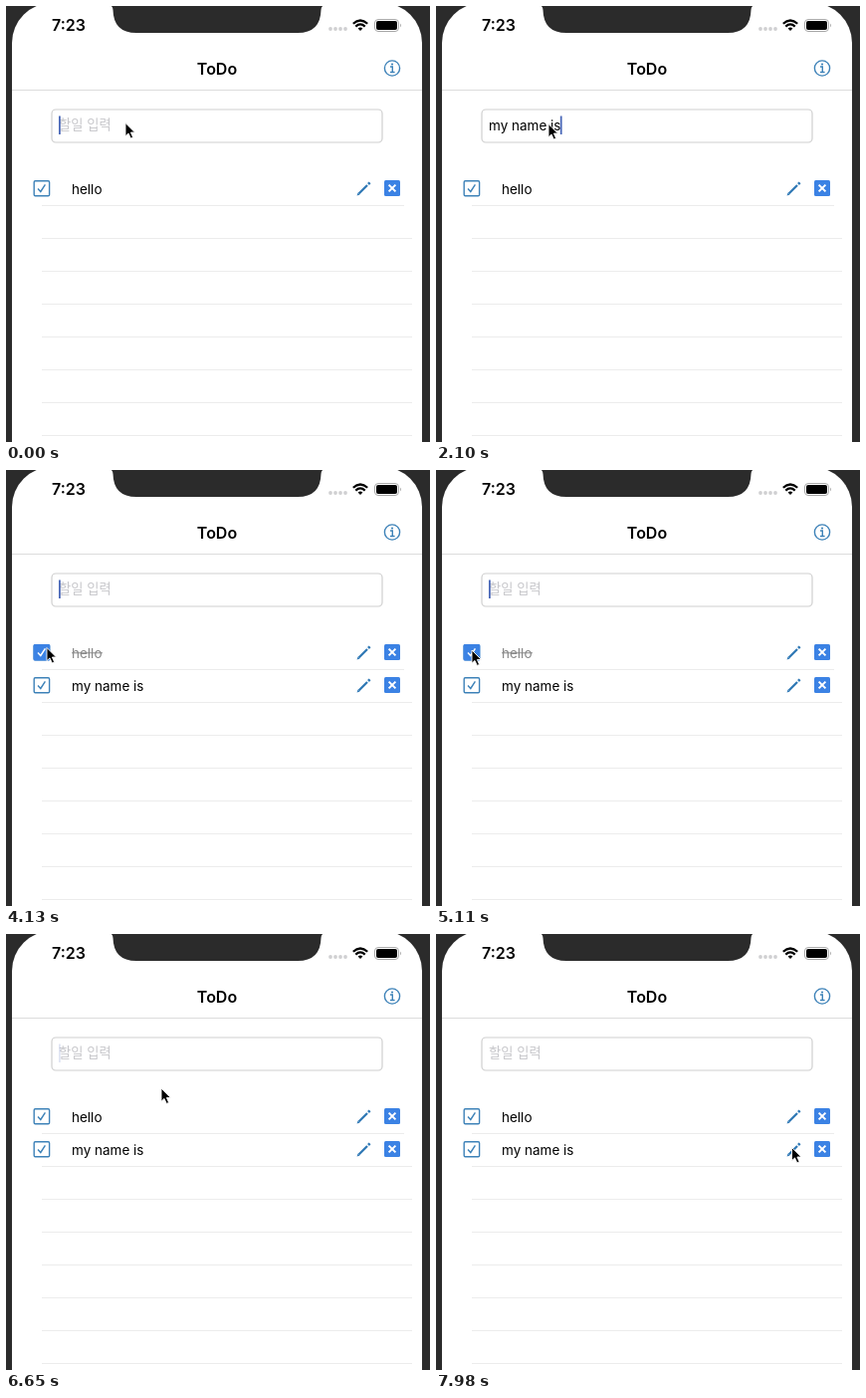
Recreate the animation shown at these times as an HTML page. Size 426 by 438 pixels, loop 8 s.

```html
<!DOCTYPE html>
<html lang="ko">
<head>
<meta charset="utf-8">
<style>
  html, body { margin: 0; width: 100%; height: 100%; overflow: hidden; background: #2b2b2b; }
  svg { display: block; width: 426px; height: 438px; }
  text { font: 13.5px Inter, "Liberation Sans", sans-serif; white-space: pre; }
  .bold { font-weight: 600; font-size: 16px; }
  .hint { font: 300 13.3px "Noto Sans CJK KR", "Noto Sans CJK", "Noto Sans CJK JP", sans-serif; fill: #c6c6ca; }
  .line { fill: none; stroke: #3d82b8; stroke-width: 1.4; }
</style>
</head>
<body>
<svg viewBox="0 0 426 438">
  <defs>
    <g id="tools">
      <path d="M354.5 188.5L363 180" stroke="#2f78b5" stroke-width="2.3"/>
      <path d="M364 179l1.6-1.6" stroke="#2f78b5" stroke-width="2.6"/>
      <path d="M352.6 190.4l.9-3 2.1 2.1z" fill="#2f78b5"/>
      <rect x="380" y="175" width="16" height="16" rx="1.5" fill="#3b82e4"/>
      <path d="M384.6 179.6l6.8 6.8m0-6.8l-6.8 6.8" stroke="#fff" stroke-width="2"/>
    </g>
    <g id="box">
      <rect x="28.2" y="175.7" width="15.4" height="15" rx="1.2" class="line"/>
      <path d="M32 183.5l2.8 3 4.6-7.2" class="line"/>
    </g>
  </defs>

  <!-- phone -->
  <rect x="6" y="-3" width="412" height="520" rx="40" fill="#fff"/>
  <path d="M104 -1Q107.500 0 107.500 4Q108 27 131 27H293Q316 27 316.500 4Q316.500 0 320 -1Z" fill="#2b2b2b"/>
  <text x="46" y="25" class="bold">7:23</text>
  <g fill="#d0d0d2">
    <circle cx="326" cy="23" r="1.9"/><circle cx="331" cy="23" r="1.9"/>
    <circle cx="336" cy="23" r="1.9"/><circle cx="341" cy="23" r="1.9"/>
  </g>
  <g fill="none" stroke="#000" stroke-width="2.2">
    <path d="M348.800 17.800Q356 11.200 363.200 17.800M351.300 20.600Q356 16.300 360.700 20.600"/>
    <path d="M353.600 22.600Q356 20.600 358.400 22.600L356 25Z" fill="#000" stroke="none"/>
  </g>
  <rect x="370.500" y="13.500" width="24" height="12" rx="3.5" fill="none" stroke="#aaa"/>
  <rect x="372" y="15" width="21" height="9" rx="2"/>
  <path d="M396 17.500q2 2 0 4z" fill="#aaa"/>

  <!-- header and field -->
  <text x="212" y="68.500" class="bold" text-anchor="middle">ToDo</text>
  <circle cx="388" cy="62.500" r="7.600" class="line"/>
  <path d="M386 61h2.300v5.500m-2.300 0h4.600" class="line"/>
  <circle cx="388" cy="58.500" r="1.100" fill="#3d82b8"/>
  <path d="M6 84.500H418" stroke="#dcdcdc"/>
  <rect x="46" y="104" width="332" height="33" rx="4" fill="#fff" stroke="#cfcfcf" stroke-width="1.200"/>
  <text id="hint" x="53" y="124" class="hint">할일 입력</text>
  <text id="typed" x="53" y="125"></text>
  <rect id="caret" y="110.500" width="1.800" height="18.500" fill="#4a68b8"/>

  <!-- list -->
  <path id="rules" stroke="#ececec"/>
  <use href="#box"/>
  <use href="#tools"/>
  <text id="hello" x="66" y="188.500">hello</text>
  <g id="done">
    <rect x="27.500" y="175" width="16.800" height="16.400" rx="1.500" fill="#3b82e4"/>
    <path d="M32 183.500l2.800 3 4.600-7.200" fill="none" stroke="#fff" stroke-width="1.500"/>
    <path d="M66 183.800H97" stroke="#888"/>
  </g>
  <g id="added" transform="translate(0 33)">
    <use href="#box"/>
    <use href="#tools"/>
    <text x="66" y="188.500">my name is</text>
  </g>

  <g id="menu">
    <path d="M26 57H82Q89 57 89 64V85Q89 92 82 92H63L54 101L45 92H26Q19 92 19 85V64Q19 57 26 57Z" fill="#262626"/>
    <text x="54" y="79.500" text-anchor="middle" fill="#fff" fill-opacity=".8">Paste</text>
  </g>
  <path id="pointer" d="M0 0V13.200L3 10.400L5.300 15.400L7.600 14.400L5.400 9.500H9.500Z" stroke="#fff" stroke-width=".9"/>
</svg>
<script>
const $ = id => document.getElementById(id);
const LOOP = 8000, STEP = 70;

// [time, typed text, caret x]
const typing = [
  [0, '', 53], [770, 'm', 64.500], [1120, 'my', 72], [1330, 'my ', 75.500], [1400, 'my n', 83.500],
  [1540, 'my na', 91.500], [1610, 'my nam', 103], [1750, 'my name', 111.500],
  [1960, 'my name ', 115.500], [2100, 'my name is', 124.800], [2660, '', 53]
];

// [time, x, y]
const path = [
  [0, 120, 117.500], [420, 120, 117.500], [490, 113, 118.500], [3220, 113, 118.500], [3500, 98, 135],
  [3780, 56, 172], [3990, 39, 182], [4130, 41, 178.500], [4760, 41, 178.500], [5110, 36, 181],
  [5670, 36, 181], [5740, 72, 190], [5880, 129, 204], [6020, 142, 212], [6300, 146, 210],
  [6510, 147, 199], [6650, 156, 155], [7000, 153, 152], [7350, 153, 156], [7560, 215, 190],
  [7770, 318, 222], [7980, 357.500, 214.500]
];

const ramp = (t, a, b) => Math.min(1, Math.max(0, (t - a) / (b - a)));
const lastBefore = (list, t) => list.findLast(k => k[0] <= t);

function pointerAt(t) {
  const a = lastBefore(path, t), b = path[path.indexOf(a) + 1] || a;
  const p = a === b ? 0 : ramp(t, a[0], b[0]);
  return [a[1] + (b[1] - a[1]) * p, a[2] + (b[2] - a[2]) * p];
}

// Solid until the entry is added, then blinking with soft edges
function caretAlpha(t) {
  if (t < 3220) return 1;
  const u = (t - 3220) % 1085;
  return 1 - ramp(u, 0, 210) + ramp(u, 560, 700);
}

function draw(now) {
  const t = Math.floor(now % LOOP / STEP) * STEP;
  const [, text, x] = lastBefore(typing, t);
  const struck = t >= 4130 && t < 5320;
  $('typed').textContent = text;
  $('hint').style.opacity = text ? 0 : 1;
  $('caret').setAttribute('x', x);
  $('caret').style.opacity = caretAlpha(t);
  $('menu').style.opacity = ramp(t, 0, 350) * (1 - ramp(t, 700, 980));
  $('added').style.opacity = ramp(t, 2590, 2730);
  $('done').style.opacity = struck ? 1 : 0;
  $('hello').style.fill = struck ? '#888' : '#000';
  $('pointer').setAttribute('transform', `translate(${pointerAt(t)})`);
  requestAnimationFrame(draw);
}

$('rules').setAttribute('d', Array.from({ length: 8 }, (_, i) =>
  `M36 ${200.5 + 33 * i}H${i ? 408 : 400}`).join(''));
requestAnimationFrame(draw);
</script>
</body>
</html>
```
